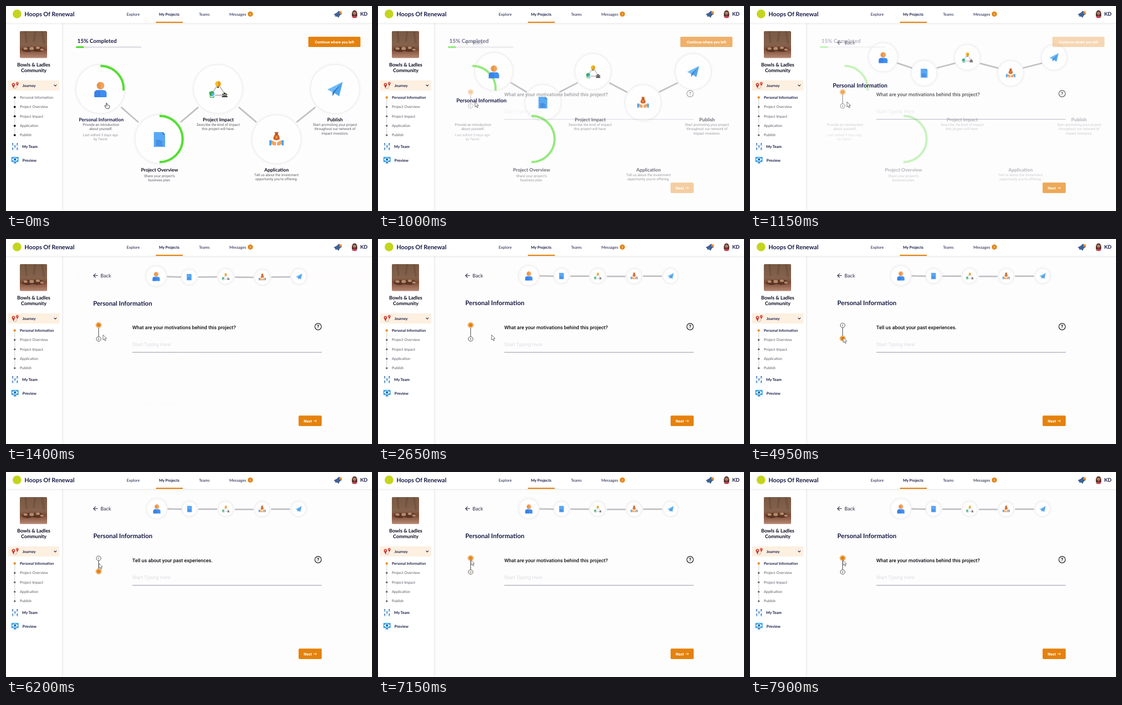
An HTML page that plays this animation: 713x400 px, repeating every 8 s.

```html
<!DOCTYPE html>
<html lang="en">
<head>
<meta charset="utf-8">
<title>Project journey</title>
<style>
html, body { margin: 0; width: 100%; height: 100%; overflow: hidden; background: #fefdfe; }
svg { display: block; width: 100vw; height: 100vh; }
text { font-family: Lato, sans-serif; fill: #161b45; text-rendering: geometricPrecision; }
.b { font-weight: 700; }
.r { font-family: Roboto, sans-serif; }
.m { font-family: Roboto, sans-serif; font-weight: 500; }
.rb { font-family: Roboto, sans-serif; font-weight: 700; }
.c { text-anchor: middle; }
.soft { filter: drop-shadow(0 0 2.5px #00000024); }

/* one loop = 8 s; the page morph runs from 850 to 1450 ms */
.out, .in, .go, .shrink, .bend, .before, .after, .one, .two, .cursor, .hand, .arrow {
  animation: 8s linear infinite;
}
.out { animation-name: out; }
.in { animation-name: in; }
.go { animation-name: go; }
.shrink { animation-name: shrink; }
.bend { animation-name: bend; }
.before { animation-name: before; animation-timing-function: step-end; }
.after { animation-name: after; animation-timing-function: step-end; }
.one { animation-name: one; }
.two { animation-name: two; }
.cursor { animation-name: move; }
.hand { animation-name: hand; animation-timing-function: step-end; }
.arrow { animation-name: arrow; animation-timing-function: step-end; }

@keyframes out {
  0%, 10.625% { opacity: 1; animation-timing-function: ease-out; }
  18.125%, 100% { opacity: 0; }
}
@keyframes in {
  0%, 10.625% { opacity: 0; animation-timing-function: ease-out; }
  18.125%, 100% { opacity: 1; }
}
@keyframes go {
  0%, 10.625% { transform: var(--a); animation-timing-function: ease-out; }
  18.125%, 100% { transform: var(--b); }
}
@keyframes shrink {
  0%, 10.625% { r: 47px; animation-timing-function: ease-out; }
  18.125%, 100% { r: var(--r); }
}
@keyframes bend {
  0%, 10.625% { d: var(--a); animation-timing-function: ease-out; }
  18.125%, 100% { d: var(--b); }
}
@keyframes before { 0% { opacity: 1; } 10.625%, 100% { opacity: 0; } }
@keyframes after { 0% { opacity: 0; } 10.625%, 100% { opacity: 1; } }
@keyframes one { 0%, 56.25% { opacity: 1; } 58.75%, 87% { opacity: 0; } 89.5%, 100% { opacity: 1; } }
@keyframes two { 0%, 56.25% { opacity: 0; } 58.75%, 87% { opacity: 1; } 89.5%, 100% { opacity: 0; } }
@keyframes hand {
  0% { opacity: 1; } 10.625% { opacity: 0; }
  50.5% { opacity: 1; } 57% { opacity: 0; }
  83% { opacity: 1; } 88%, 100% { opacity: 0; }
}
@keyframes arrow {
  0% { opacity: 0; } 10.625% { opacity: 1; }
  50.5% { opacity: 0; } 57% { opacity: 1; }
  83% { opacity: 0; } 88%, 100% { opacity: 1; }
}
@keyframes move {
  0%, 7% { transform: translate(195px, 189px); }
  10.625%, 21.5% { transform: translate(189px, 187px); }
  33.125% { transform: translate(221px, 187px); }
  38% { transform: translate(258px, 173px); }
  43% { transform: translate(240px, 169px); }
  51.5%, 57% { transform: translate(183px, 197px); }
  64% { transform: translate(181px, 190px); }
  74% { transform: translate(182px, 188px); }
  77.5% { transform: translate(181px, 178px); }
  84% { transform: translate(181px, 171px); }
  96%, 100% { transform: translate(181px, 172px); }
}
</style>
</head>
<body>
<svg id="stage" viewBox="0 0 713 400" preserveAspectRatio="none"></svg>
<script>
const ORANGE = '#e5820d', GREEN = '#54df31', INK = '#161b45';

const text = (x, y, size, str, cls = '', fill = '') =>
  `<text x="${x}" y="${y}" font-size="${size}" class="${cls}" ${fill && `style="fill:${fill}"`}>${str}</text>`;
const lines = (x, y, list, fill = '#5b5b60') =>
  list.map((s, i) => text(x, y + i * 8.3, 6.9, s, 'r c', fill)).join('');
const rect = (x, y, w, h, fill, rx = 0) =>
  `<rect x="${x}" y="${y}" width="${w}" height="${h}" rx="${rx}" fill="${fill}"/>`;
const dot = (x, y, r, fill, extra = '') => `<circle cx="${x}" cy="${y}" r="${r}" fill="${fill}" ${extra}/>`;
const path = (d, fill, extra = '') => `<path d="${d}" fill="${fill}" ${extra}/>`;
const stroke = (d, color, w, extra = '') =>
  `<path d="${d}" fill="none" stroke="${color}" stroke-width="${w}" ${extra}/>`;
const group = (cls, body) => `<g class="${cls}">${body}</g>`;
const place = ([x, y], s) => `translate(${x}px,${y}px) scale(${s})`;
const mover = (from, to, s0, s1, body) =>
  `<g class="go" style="--a:${place(from, s0)};--b:${place(to, s1)}">${body}</g>`;

const icons = {
  person: path('M-12 15V9Q-12 2 -5 2H5Q12 2 12 9V15Q12 16 11 16H-11Q-12 16 -12 15Z', '#3f8df2') +
    path('M-12 15V9Q-12 2 -5 2H-3L0 8V16H-11Q-12 16 -12 15Z', '#2f78dd', 'opacity=".5"') +
    dot(0, -6.5, 7.3, '#e8944a') + path('M0 -13.800A7.300 7.300 0 0 1 0 .8Z', '#f2a35a'),
  doc: path('M-11 -14H6L11 -9V15H-11Z', '#5aa9f5') + path('M6 -14V-9H11Z', '#2a72cf') +
    stroke('M-7 3H3M-7 6H7M-7 9H5M-7 12H7', '#2563be', 1),
  impact: stroke('M-2 -6L-10 6M3 -6L12 8M-6 12H8', '#454a55', .8) +
    dot(0, -10, 5.5, '#f6bd22') + path('M0 -15.500A5.500 5.500 0 0 1 0 -4.500Z', '#e99a16') +
    rect(-2, -5, 4, 3, '#6b5a35', 1) +
    dot(-12, 9, 5.2, '#54b8e8') + path('M-17 6L-11 4L-8 8L-13 9L-12 14L-16 13Z', '#3daa49') +
    path('M-18 13Q-12 19 -6 13L-8 17H-15Z', '#3daa49') +
    dot(13, 9, 2.2, '#4a443e') + dot(9.5, 10.5, 1.8, '#6e655a') + dot(16.5, 10.5, 1.8, '#6e655a') +
    path('M7 16Q8 12 13 12Q18 12 19 16Z', '#4a443e'),
  hands: path('M-2.500 -10L-4 -14H4L2.500 -10Q7 -5 6 0Q0 4 -6 0Q-7 -5 -2.500 -10Z', '#cf652b') +
    stroke('M-2.500 -10H2.500', '#8b3e17', 1.3) + dot(0, -4, 2, '#eea04a') +
    path('M-10 2Q-5 4 -1 6V12H-6L-10 9Z', '#efa562') + path('M10 2Q5 4 1 6V12H6L10 9Z', '#efa562') +
    rect(-14, 2, 4, 10, '#4ba3ee') + rect(10, 2, 4, 10, '#4ba3ee'),
  plane: path('M-15 1L15 -14L-5 6Z', '#6cbcf7') + path('M15 -14L8 14L-1 8Z', '#4fa7ee') +
    path('M-5 6L15 -14L-1 8L-5 14Z', '#2d7fce')
};

// [icon, start, end, end radius, icon end scale]
const steps = [
  ['person', [184, 162], [293.8, 71.5], 19, .59],
  ['doc', [299, 259.5], [357.5, 72], 14, .42],
  ['impact', [413, 162], [428, 72], 14, .4],
  ['hands', [527, 260], [499, 72.500], 14, .49],
  ['plane', [641, 162], [570, 72], 14, .41]
];
const links = [
  ['225 198L257 226', '316 72L341 72.500'],
  ['341 226L374 198', '376 72.500L410 72.500'],
  ['454 198L487 226', '447 73L481 73'],
  ['567 226L602 198', '517.500 72.500L552 72.500']
];

const header = rect(0, 0, 713, 33, '#fff') +
  dot(21.5, 15.5, 8.5, '#c4d51d') + text(36, 20, 11.7, 'Hoops Of Renewal', 'b') +
  text(235, 18.5, 7.7, 'Explore') + text(298, 18.5, 7.5, 'My Projects', 'b') +
  rect(292, 30.7, 52.5, 2.3, ORANGE) + text(376, 18.5, 7.6, 'Teams') + text(435, 18.5, 7.7, 'Messages') +
  dot(476, 15.7, 5, ORANGE) + text(476, 18, 6, '2', 'c', '#fff') +
  path('M638.500 16Q645 14 648.500 9L654.500 15.500Q649.500 17.500 648 23L644.500 20L642.500 21.500L641 18.500Z', '#3f6195') +
  dot(651.8, 12.7, 2.5, '#f58a1c') +
  `<clipPath id="face"><circle cx="679" cy="15.500" r="8"/></clipPath><g clip-path="url(#face)">` +
  rect(670, 7, 18, 18, '#f3ecea') + path('M674 20Q673 8.500 679 8.500Q685 8.500 684 20Z', '#432b28') +
  dot(679, 14, 3.2, '#b97858') + path('M673 25Q674.500 18.500 679 18.500Q683.500 18.500 685 25Z', '#c33a48') + '</g>' +
  text(690, 19, 10, 'KD', 'b');

const photo = `<clipPath id="shot"><rect x="27" y="49" width="53" height="52.500" rx="2"/></clipPath>
  <g clip-path="url(#shot)">${rect(27, 49, 53, 53, 'url(#earth)')}
  ${stroke('M38 49L40 72M57 49L54 70M70 49L74 74', '#4a3527', 4, 'opacity=".25"')}
  <g fill="#5a3526"><ellipse cx="42" cy="85" rx="11" ry="5"/><ellipse cx="61" cy="84.500" rx="13" ry="5"/></g>
  <g fill="#b58a69"><ellipse cx="38" cy="83" rx="4" ry="2.500"/><ellipse cx="50" cy="83" rx="4.500" ry="3"/>
  <ellipse cx="62" cy="81.500" rx="4" ry="2.500"/><ellipse cx="70" cy="85" rx="3.500" ry="2"/></g></g>`;

const pin = (x, y, s) => path(`M${x} ${y + 7 * s}L${x - 3 * s} ${y + s}A${3.2 * s} ${3.2 * s} 0 1 1 ${x + 3 * s} ${y + s}Z`, '#d0392f') +
  dot(x, y - .4, 1.2 * s, '#fff');
const teammate = ([x, y]) => dot(x, y - 1.3, 1.2, '#2a5f9a') + path(`M${x - 2} ${y + 2}Q${x} ${y - 1} ${x + 2} ${y + 2}Z`, '#2f86d6');

const menu = ['Personal Information', 'Project Overview', 'Project Impact', 'Application', 'Publish'];
const menuY = i => 178.5 + i * 18.4;
const sidebar = rect(0, 33, 109, 367, '#fff') + photo +
  text(54, 118, 9.6, 'Bowls &amp; Ladles', 'b c', '#08091c') + text(54, 128.5, 9.6, 'Community', 'b c', '#08091c') +
  rect(4, 145, 100, 20, '#fdf0e1', 1) +
  stroke('M14.500 160.500H20L22 156', '#8a6a5a', .8, 'stroke-dasharray="1.500 1"') +
  pin(14.5, 153.5, 1) + pin(22, 151, .8) +
  text(32, 157.5, 7.3, 'Journey', 'b') + stroke('M93.500 153.700L96 156.200L98.500 153.700', INK, 1.2) +
  stroke('M17 178V252', '#b9b9bd', .8) +
  menu.map((s, i) => (i ? text(27, menuY(i) + 2.3, 7.2, s, '', '#5c5c66') : '') +
    dot(17, menuY(i), 1.8, '#5c5c66') + group('before', dot(17, menuY(i), 2, '#111'))).join('') +
  group('before', text(27, 180.8, 7.1, menu[0], '', '#5c5c66')) +
  group('after', text(27, 180.8, 7.1, menu[0], 'b') +
    dot(17, 178.5, 2.9, '#fbd9ae') + dot(17, 178.5, 1.9, ORANGE)) +
  '<circle cx="17.500" cy="274.500" r="5.500" fill="none" stroke="#8cc3f0" stroke-width=".7" stroke-dasharray="2 2"/>' +
  [[13, 270], [22, 270], [17.5, 274.5], [13, 279], [22, 279]].map(teammate).join('') +
  text(31.5, 277.3, 7.5, 'My Team', 'b') +
  rect(10.5, 294.5, 14, 10, '#36a3e8', 1) + path('M11.500 299.500Q17.500 292.500 23.500 299.500Q17.500 306 11.500 299.500Z', '#fff') +
  dot(17.5, 299.3, 2.4, '#1f6cab') + path('M16 305H19L20.500 307H14.500Z', '#2a75b5') +
  text(32, 303.7, 7.6, 'Preview', 'b');

const arc = (x, y, d) => stroke(`M${x} ${y - 45}A45 45 0 0 1 ${d}`, GREEN, 4.3);
const overview =
  text(139, 72, 10.8, '15% Completed', 'b') +
  rect(136, 78.5, 128, 3.6, '#e3e3e7', 1.8) + rect(136, 78.5, 16, 3.6, GREEN, 1.8) +
  rect(589, 60, 101.5, 20, ORANGE, 1.5) + text(640, 72.6, 7.2, 'Continue where you left', 'rb c', '#fff') +
  arc(184, 162, '229 165') + arc(299, 259.5, '299 304.500') +
  lines(185, 233.8, ['Provide an introduction', 'about yourself.']) +
  lines(184, 253.5, ['Last edited 3 days ago', 'by Tavrin'], '#97979c') +
  [['Project Overview', 299, 323, 333.5, ['Share your project’s', 'business plan.']],
   ['Project Impact', 413.5, 225, 234, ['Describe the kind of impact', 'this project will have.']],
   ['Application', 527, 323, 332, ['Tell us about the investment', 'opportunity you’re offering.']],
   ['Publish', 641, 225, 234, ['Start promoting your project', 'throughout our network of', 'impact investors.']]
  ].map(([s, x, y, y2, list]) => text(x, y, 9.3, s, 'b c', '#0c0d1c') + lines(x, y2, list)).join('');

const active = y => dot(180.5, y, 5.3, '#fff', `stroke="${ORANGE}" stroke-width=".9"`) + dot(180.5, y, 4.1, ORANGE);
const idle = (y, n) => dot(180.5, y, 4.5, '#fff', 'stroke="#333" stroke-width=".9"') +
  text(180.5, y + 2.1, 5.8, n, 'r c', '#222');
const question = s => text(246, 176, 9.73, s, 'm', '#0d0d12');
const form =
  stroke('M179 71.500H170.500M174.500 67.500L170.500 71.500L174.500 75.500', '#25293f', 1.1) +
  text(184, 75, 9.7, 'Back', '', '#25293f') +
  stroke('M180.500 173V190', '#444', 1) +
  group('one', active(168) + idle(195, 2) + question('What are your motivations behind this project?')) +
  group('two', idle(168.5, 1) + active(194) + question('Tell us about your past experiences.')) +
  text(246, 208.7, 9.7, 'Start Typing Here', 'r', '#dcdce0') + rect(246, 220.6, 369, 1, '#8b8f9e') +
  dot(608, 171, 6.3, 'none', 'stroke="#111" stroke-width="1.200"') + text(608, 174.3, 9, '?', 'rb c', '#111') +
  rect(570, 344.5, 45, 20.5, ORANGE, 2) + text(580, 357.6, 7.5, 'Next', 'rb', '#fff') +
  stroke('M599 355H605M602.800 352.800L605 355L602.800 357.200', '#fff', .9);

const cursor = group('cursor',
  group('arrow', path('M0 0V10L2.300 8L4 11.800L5.600 11L4 7.300H7Z', '#fff',
    'stroke="#444" stroke-width=".8" stroke-linejoin="round"')) +
  group('hand', path('M0 1Q1 -.3 1.900 1V4.300Q3 3.600 3.600 4.600Q4.700 4 5.200 5Q6.400 4.600 6.700 5.800V8L5.600 11H.4L-2.800 6.600Q-3 5 -1.700 5.500L0 7Z',
    '#fff', 'stroke="#222" stroke-width=".9" stroke-linejoin="round"')));

document.getElementById('stage').innerHTML = `
  <defs><linearGradient id="earth" x2="0" y2="1">
    <stop stop-color="#7a5a45"/><stop offset=".5" stop-color="#84624c"/>
    <stop offset=".68" stop-color="#7c4c38"/><stop offset="1" stop-color="#b98a74"/>
  </linearGradient></defs>
  ${rect(0, 0, 713, 400, '#fefdfe')}
  ${group('soft', sidebar)}${group('soft', header)}
  ${links.map(([a, b]) => `<path class="bend" fill="none" stroke="#c2c2c6" stroke-width="3" stroke-linecap="round"
    style='--a:path("M${a}");--b:path("M${b}")'/>`).join('')}
  ${group('soft', steps.map(([, a, b, r]) =>
    mover(a, b, 1, 1, dot(0, 0, 47, '#fffeff', `class="shrink" style="--r:${r}px"`))).join(''))}
  ${group('out', overview)}
  ${steps.map(([name, a, b, , s]) => mover(a, b, 1, s, icons[name])).join('')}
  ${group('in', form)}
  ${mover([142, 225], [170, 128.5], .757, 1, text(0, 0, 12.35, 'Personal Information', 'b'))}
  ${cursor}`;
</script>
</body>
</html>
```
